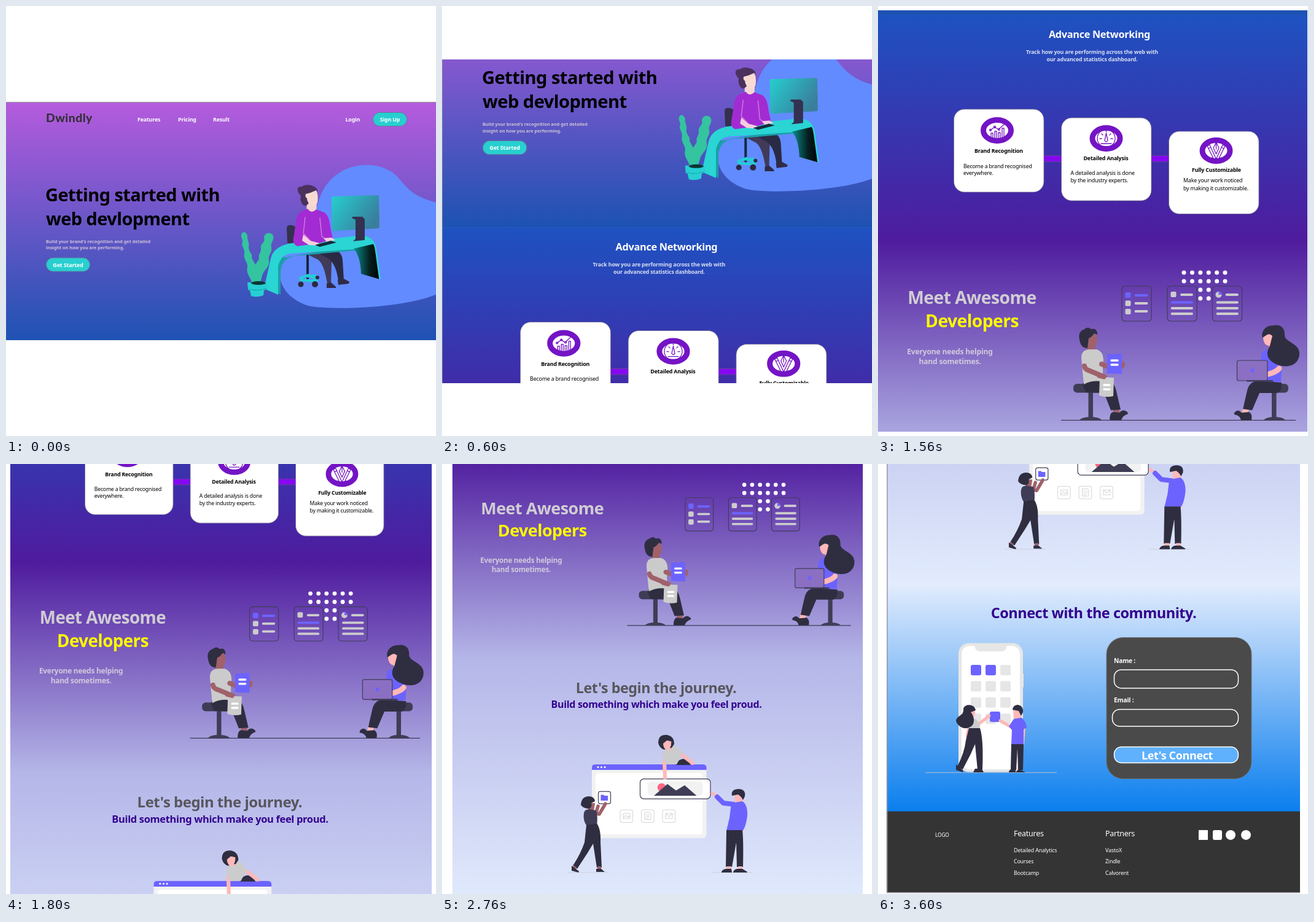
Recreate the animation shown at these times as an HTML page. Size 700 by 700 pixels, loop 4.2 s.

```html
<!DOCTYPE html>
<html lang="en">
<head>
<meta charset="utf-8">
<title>Landing page tour</title>
<style>
html, body { margin: 0; width: 100%; height: 100%; overflow: hidden; background: #fff; }
svg { display: block; width: 100vw; height: 100vh; }
text { font-family: "Noto Sans", sans-serif; letter-spacing: -.02em; fill: #fff; }
.b { font-weight: 700; }
.s { font-size: 8.85px; }
.k { fill: #000; }
.mid { text-anchor: middle; }
.dark { fill: #2f2e41; }
.slate { fill: #3f3d56; }
.vio { fill: #6c63ff; }
.pink { fill: #ffb8b8; }
.tan { fill: #a0616a; }
.grey { fill: #ccc; }
.white { fill: #fff; }
.line { fill: none; stroke-linecap: round; stroke-linejoin: round; }
.edge { stroke: #3f3d56; stroke-width: 1.2; }
</style>
</head>
<body>
<svg viewBox="0 0 700 700">
<defs>
  <clipPath id="clip"><rect id="win"/></clipPath>
  <linearGradient id="g1" x2="0" y2="1"><stop stop-color="#b55bdd"/><stop offset="1" stop-color="#1c52b2"/></linearGradient>
  <linearGradient id="g2" x2="0" y2="1"><stop stop-color="#1e52c1"/><stop offset="1" stop-color="#4f1b9e"/></linearGradient>
  <linearGradient id="g3" x2="0" y2="1"><stop stop-color="#4f1b9e"/><stop offset="1" stop-color="#b4b5e7"/></linearGradient>
  <linearGradient id="g4" x2="0" y2="1"><stop stop-color="#b4b6e8"/><stop offset="1" stop-color="#e2ecfd"/></linearGradient>
  <linearGradient id="g5" x2="0" y2="1"><stop stop-color="#e2ecfd"/><stop offset="1" stop-color="#0a7eee"/></linearGradient>
  <linearGradient id="screen" y2=".5"><stop stop-color="#25d0cf"/><stop offset="1" stop-color="#397f9d"/></linearGradient>
  <linearGradient id="leg"><stop stop-color="#0b8f91"/><stop offset=".6" stop-color="#04201f"/><stop offset="1" stop-color="#000"/></linearGradient>
</defs>
<g clip-path="url(#clip)"><g id="page">

<g id="back">
  <rect x="-6" y="-381" width="720" height="396" fill="url(#g1)"/>
  <rect x="-6" y="14.500" width="720" height="368" fill="url(#g2)"/>
  <rect x="-6" y="382" width="720" height="347" fill="url(#g3)"/>
  <rect x="-6" y="728.500" width="720" height="427" fill="url(#g4)"/>
  <rect x="-6" y="1155" width="720" height="388" fill="url(#g5)"/>
  <rect x="-6" y="1541.500" width="720" height="138" fill="#343434"/>
  <path d="M-6-379.600H714M-3.400-380V1680M-6 1679.500H714" stroke="#98969f" stroke-width="1.400"/>
</g>

<g id="hero" transform="scale(1.0015) translate(-2.9 -535.5)">
  <text x="65" y="189" style="font:800 19.5px Lato,sans-serif;letter-spacing:.02em;fill:#34303a">Dwindly</text>
  <g class="b" font-size="8.9">
    <text x="214" y="188.300">Features</text><text x="280" y="188.300">Pricing</text>
    <text x="337" y="188.300">Result</text><text x="552.500" y="188.300">Login</text>
  </g>
  <g fill="#28cfd0" stroke="#5d7f9c">
    <rect x="597.500" y="173.500" width="55" height="22" rx="11"/>
    <rect x="65.500" y="410" width="71" height="22" rx="11"/>
  </g>
  <text class="b mid" x="625" y="188.300" font-size="8.9">Sign Up</text>
  <text class="b mid" x="101" y="424.800" font-size="9">Get Started</text>
  <g class="b" font-size="29"><text class="k" x="64" y="318">Getting started with</text><text class="k" x="65" y="357">web devlopment</text></g>
  <g class="b" font-size="7.25">
    <text x="65" y="386" style="fill:#cfc3d6;letter-spacing:0">Build your brand's recognition and get detailed</text>
    <text x="65" y="396" style="fill:#cfc3d6;letter-spacing:0">insight on how you are performing.</text>
  </g>

  <path fill="#628bff" d="M710 322C672 314 657 303 640 281C618 254 572 253 545 270C518 286 510 310 503 338C496 366 462 385 449 415C440 440 447 473 492 488C530 496 660 492 710 465Z"/>
  <path fill="#34304f" d="M457 361Q458 355 466 357L478 362V388L458 386Z"/>
  <!-- chair and legs -->
  <path class="line" stroke="#17263f" stroke-width="4" d="M491 405V443"/>
  <path class="line" stroke="#22cfd3" stroke-width="4" d="M479 443L492 438L506 446M491 440L503 439M480 446L505 448"/>
  <g fill="#2d2843"><circle cx="480" cy="453" r="4.500"/><circle cx="503" cy="453" r="5"/><circle cx="507" cy="442" r="3"/></g>
  <path fill="#413a58" d="M490 404L521 402Q530 405 530 416L529 451L523 452Q518 420 508 413Z"/>
  <path fill="#2a2a45" d="M510 403L539 399Q547 402 548 414L550 447L541 448Q538 422 526 412Z"/>
  <path fill="#302a48" d="M522 452L529 450L537 457V459H522ZM540 446L550 444L559 449L558 452L541 454Z"/>
  <!-- desk -->
  <path fill="#1a9fa9" d="M441 412L570 388V398L470 407Q449 411 447 432V470L441 466Z"/>
  <path fill="#2ad5d4" d="M420 460L431 411Q436 390 466 386L572 374Q594 374 601 390L567 396L464 403Q447 405 443 424V470Z"/>
  <path fill="url(#leg)" d="M566 395L600 387L609 445L578 436Q577 407 566 395Z"/>
  <path class="line" stroke="#2ad5d4" stroke-width="2.500" d="M586 376Q600 381 602 397L608.500 444"/>
  <path fill="url(#screen)" d="M533 310L604 308Q607 308 607 311L608 359Q608 362 605 362L534 366Q531 366 531 363L530 313Q530 310 533 310Z"/>
  <path fill="#333052" d="M563 345Q563 343 566 343L580 343L584 347V381L565 383L569 379V348Z"/>
  <!-- worker -->
  <path fill="#f5d6d2" d="M490 318H506L505 339L489 335Z"/>
  <path fill="#a32bd3" d="M482 334L491 330Q497 339 505 331L518 336Q526 341 528 360L532 379L511 386L474 391Q466 388 468 377L473 346Q475 337 482 334Z"/>
  <path class="line" stroke="#d98ae2" stroke-width="1.200" d="M487 344L484 370L496 383M511 345L514 375L520 379"/>
  <path fill="#f4cede" d="M484 372L495 382L510 386L507 390L493 389L482 382ZM517 378L530 377L536 381L523 385Z"/>
  <path fill="#142c3c" d="M503 389L529 382L538 385L511 392Z"/>
  <path fill="#4b315d" d="M480 309C472 301 473 293 482 294C486 289 503 291 507 299L506 306L490 309Q490 316 493 321Q486 329 482 322Q478 316 480 309Z"/>
  <path fill="#f7dbd2" d="M488 306Q497 304 505 300Q509 308 507 320Q503 328 495 324Q490 318 490 313Q486 311 488 306Z"/>
  <!-- plant -->
  <path fill="#34c4a0" d="M383 372C385 366 391 367 393 374C392 382 397 384 395 393C395 401 402 403 400 410L406 421L412 412C410 403 416 402 415 394C414 386 423 385 420 377C421 368 432 367 435 374C437 382 430 385 432 393C434 401 426 405 428 414C430 424 421 429 418 436L413 453H401C400 443 390 437 393 425C394 417 386 413 388 403C389 394 382 391 385 384C386 380 382 377 383 372Z"/>
  <path fill="#26cfd2" d="M393 450L424 449L426 460L420 463L419 471Q408 475 399 472L397 463L394 462Z"/>
  <ellipse cx="411" cy="451" rx="12" ry="3" fill="#0b3534"/>
  <path class="line" stroke="#159ea8" d="M396 461Q409 465 424 460"/>
</g>

<g id="cards">
  <text class="b mid" x="360.500" y="52" font-size="16.300">Advance Networking</text>
  <g class="b mid s" fill-opacity=".82"><text x="348.500" y="78">Track how you are performing across the web with</text><text x="348.500" y="90">our advanced statistics dashboard.</text></g>
  <path d="M265 248.500H305M440 248.500H480" stroke="#6b3f9d" stroke-width="10.500"/>
  <path d="M265 248.500H305M440 248.500H480" stroke="#8606f2" stroke-width="8.500"/>
  <g fill="#fff" stroke="#6f6a8c" stroke-width=".8">
    <rect x="123.500" y="168" width="146.500" height="135" rx="17"/>
    <rect x="298.500" y="182" width="146.500" height="135" rx="17"/>
    <rect x="473.500" y="204" width="146.500" height="134.500" rx="17"/>
  </g>
  <g fill="#fff" stroke="#7414c5" stroke-width="9">
    <ellipse cx="194" cy="202.500" rx="22.500" ry="17"/><ellipse cx="371.500" cy="215.500" rx="22.500" ry="17"/><ellipse cx="550.500" cy="235.500" rx="22.500" ry="17"/>
  </g>
  <g class="line" stroke="#7414c5" stroke-width="1.300">
    <path d="M180 216H209M184 215V207H187V215M190 215V204H193V215M196 215V206H199V215M202 215V199H205V215M183 202L190 197L196 201L206 192"/>
    <circle cx="183" cy="202" r="1.500"/><circle cx="190" cy="197" r="1.500"/><circle cx="197" cy="201" r="1.500"/>
    <circle cx="371.500" cy="215.500" r="14.500"/><path d="M371.500 207L369 219Q371.500 223 374 219ZM361 216H364M379 216H382M364 208L366 210M379 208L377 210M371.500 203V205M363 224H380"/>
    <path d="M536 228L540 226L550 248L547 250ZM565 228L561 226L551 248L554 250ZM550.500 222L546 231L550.500 241L555 231ZM550.500 222V233M538 232L542 230M563 232L559 230M543 247L550 250L558 247"/>
  </g>
  <g class="b s"><text class="k" x="157" y="239">Brand Recognition</text><text class="k" x="334.500" y="251.300">Detailed Analysis</text><text class="k" x="511" y="270">Fully Customizable</text></g>
  <g class="s"><text class="k" x="139" y="263.500">Become a brand recognised</text><text class="k" x="139" y="275">everywhere.</text>
    <text class="k" x="313.500" y="275.300">A detailed analysis is done</text><text class="k" x="313.500" y="287.300">by the industry experts.</text>
    <text class="k" x="497" y="287.300">Make your work noticed</text><text class="k" x="497" y="299.500">by making it customizable.</text></g>
</g>

<g id="meet">
  <g class="b mid" font-size="28.300"><text x="153" y="484.500" style="fill:#d0cdd3">Meet Awesome</text><text x="153" y="522.500" style="fill:#fdf900">Developers</text></g>
  <g class="b mid" font-size="12.200"><text x="117" y="567" style="fill:#d0c8dc">Everyone needs helping</text><text x="117" y="583" style="fill:#d0c8dc">hand sometimes.</text></g>
  <g id="dots" class="white"></g>
  <g class="line edge"><rect x="397" y="456" width="48" height="57" rx="5"/><rect x="471" y="456" width="48" height="57" rx="5"/><rect x="544.500" y="456" width="48" height="57" rx="5"/></g>
  <g class="line" stroke="#ccc" stroke-width="3.800">
    <path d="M419.500 484H437.500M419.500 497H437.500M494 470H511M478.500 492H511M478.500 501H511M567.500 470H585M552.500 482.500H585M552.500 492H585M552.500 501H585"/>
    <path stroke="#6c63ff" d="M419.500 471H437.500M478.500 482.500H511"/>
  </g>
  <rect class="vio" x="402.500" y="466" width="9" height="9" rx="2"/>
  <g class="grey"><rect x="402.500" y="479.500" width="9" height="9" rx="2"/><rect x="402.500" y="493" width="9" height="9" rx="2"/><rect x="476.500" y="465" width="9" height="9" rx="2"/><circle cx="554.500" cy="470" r="5"/></g>
  <path class="vio" d="M554.500 470V465A5 5 0 0 1 559.500 470Z"/>
  <path class="edge" d="M298 674.300H680"/>
  <g class="slate">
    <rect x="318" y="615" width="46" height="14.500" rx="6"/><rect x="342.500" y="628" width="7.500" height="43"/><path d="M328 674Q332 669 346 669Q360 669 364 674Z"/>
    <rect x="621" y="615" width="47" height="14.500" rx="6"/><rect x="641" y="628" width="7.500" height="43"/><path d="M628 674Q632 669 645 669Q659 669 663 674Z"/>
  </g>
  <!-- left sitter -->
  <path class="tan" d="M382 650H393L393 664L383 663ZM339 548L354 547L353 562L340 562ZM395 579Q402 577 402 583Q402 591 395 591Z"/>
  <ellipse class="tan" cx="349" cy="543" rx="8" ry="13"/>
  <path class="dark" d="M341 557Q330 557 328 543Q325 530 336 526Q342 521 347 526Q357 523 357 535L352 533Q348 539 343 541Z"/>
  <path class="dark" d="M333 617Q334 608 348 609L376 610Q385 613 388 627L395 657L379 658L368 630L338 629Z"/>
  <path fill="#cbcbcb" d="M331 573Q331 559 345 559L356 559Q366 562 367 575L366 588L366 603L363 611Q348 609 335 616Z"/>
  <path class="line" stroke="#a0616a" stroke-width="8" d="M336 586Q337 592 345 594L369 604M364 583L382 590"/>
  <path class="dark" d="M377 672Q378 661 383 661L393 662Q399 655 406 661L407 664Q399 666 396 674H378Z"/>
  <path class="vio" d="M373 567L397 566L397 599L373 598Z"/>
  <path fill="#ccc" d="M361 604L384 605L383 635Q372 638 360 634Z"/>
  <path class="line" stroke="#fff" stroke-width="3.400" d="M380 577H390M380 584H390M368 617H377M368 624H377"/>
  <path class="line" stroke="#a0616a" stroke-width="7" d="M360 602L368 604"/>
  <!-- right sitter -->
  <path class="pink" d="M595 650H605L602 664H592ZM637 544H650V562H636Z"/>
  <ellipse class="pink" cx="636" cy="540" rx="9" ry="13"/>
  <path class="vio" d="M624 570Q625 558 637 559L650 557Q658 562 658 578L656 612H625L621 594Z"/>
  <path class="dark" d="M626 540C623 531 630 520 643 520C657 517 663 526 662 537C664 548 687 549 686 567C685 585 665 592 646 582C631 574 632 563 638 553L642 537Q637 532 632 536Z"/>
  <path class="dark" d="M657 613L618 610Q604 612 601 626L594 656L609 658L621 630L650 630Q658 627 657 613Z"/>
  <path class="line" stroke="#ffb8b8" stroke-width="9" d="M653 590Q648 597 628 601"/>
  <path class="dark" d="M580 662Q586 655 592 662L604 661Q610 664 608 674H591Q589 666 580 665Z"/>
  <rect x="584.500" y="577" width="49.500" height="33" rx="3" fill="#8b6fc2" class="edge"/>
  <path class="slate" d="M600 609H643V611.500H600Z"/><circle class="vio" cx="609.500" cy="593.500" r="3.200"/>
</g>

<g id="journey" transform="scale(1.0488) translate(-17.3 380)">
  <text class="b mid" x="348.500" y="373" font-size="23.300" style="fill:#58565c">Let's begin the journey.</text>
  <text class="b mid" x="349" y="397" font-size="16" style="fill:#33018f">Build something which make you feel proud.</text>
  <rect x="244" y="489" width="186.500" height="120" rx="6" fill="#f2f2f2"/>
  <path class="vio" d="M244 498V494Q244 489 250 489H424Q430.500 489 430.500 494V498Z"/>
  <rect class="white" x="250" y="503" width="174" height="100" rx="5"/>
  <g class="white"><circle cx="254" cy="493.500" r="1.500"/><circle cx="259.500" cy="493.500" r="1.500"/><circle cx="265" cy="493.500" r="1.500"/></g>
  <rect class="edge" x="322.500" y="512.500" width="114.500" height="32.500" rx="6" fill="#fff"/>
  <rect x="335" y="517" width="89.500" height="23" rx="5" fill="#f2f2f2"/>
  <circle cx="357.500" cy="526.500" r="6.800" fill="#ff6584"/>
  <path class="slate" d="M345 540L367 521L381 531.500L395 523L414.500 540Z"/>
  <g class="line" stroke="#d6d6d6">
    <rect x="290" y="563" width="20.500" height="20.500" rx="3"/><rect x="324.500" y="563" width="20.500" height="20.500" rx="3"/><rect x="359" y="563" width="20.500" height="20.500" rx="3"/>
    <path d="M295 569H306V577H295ZM295 576L299 572L302 575L304 573L306 575M330 567H338L340 569V579H330ZM332 571H338M332 574H338M332 577H336M364 569H375V577H364ZM364 569L369.500 574L375 569"/>
  </g>
  <!-- top helper -->
  <path class="dark" d="M380 490Q385 480 393 480Q401 481 405 490Z"/>
  <path class="line" stroke="#ffb8b8" stroke-width="6" d="M362 483L363 511M386 470L408 487"/>
  <path class="grey" d="M359 469Q368 460 378 459Q387 461 391 472L382 489H365Q358 479 359 469Z"/>
  <path class="dark" d="M352 454Q352 440 366 441Q378 443 378 456L374 462L362 465Q354 463 352 454Z"/>
  <path class="pink" d="M360 451L373 449Q374 458 371 462L374 466L364 465Q359 460 360 451Z"/>
  <path class="dark" d="M357 453Q360 444 374 446L375 452L366 450L359 456Z"/>
  <!-- left helper -->
  <path d="M204 665H271M438 665H505" stroke="#cfcfdc"/>
  <rect class="edge" x="254.500" y="533" width="20" height="20" rx="3" fill="#fff"/>
  <path class="vio" d="M258.500 538.500H263L264.500 540H270V548H258.500Z"/>
  <path class="line" stroke="#a0616a" stroke-width="5.500" d="M248 568L256 570L266 553M250 571L254 557"/>
  <path class="tan" d="M238 552H249L247 565H238Z"/>
  <path class="slate" d="M231 568Q232 562 240 562L251 564Q254 575 252 588L236 590Q229 580 231 568Z"/>
  <path class="dark" d="M226 555Q227 541 239 541Q248 541 249 549L243 552Q245 558 240 561Q230 561 226 555Z"/>
  <path class="dark" d="M235 588L252 585Q259 595 258 615L260 657H252L246 618L237 633L220 659L213 654Q226 634 232 616Z"/>
  <path class="tan" d="M214 653L219 657L217 661L212 658ZM253 655H259V661H253Z"/>
  <path class="dark" d="M211 654L223 663L222 665L211 662ZM251 659H259L265 664H251Z"/>
  <!-- right helper -->
  <path class="line" stroke="#ffb8b8" stroke-width="5" d="M440 536L446 541M490 590L488 597"/>
  <path class="line" stroke="#6c63ff" stroke-width="8" d="M448 542L458 552L475 554"/>
  <path class="pink" d="M476 537H490L489 553H477Z"/>
  <path class="vio" d="M471 552L489 549Q498 555 497 573Q495 588 491 595L489 597H463L468 576Z"/>
  <path class="dark" d="M472 540Q470 530 482 529Q495 529 493 541L490 547Q487 541 482 538Z"/>
  <path class="dark" d="M463 596H489Q491 613 490 656H480L479 616L472 656H462Z"/>
  <path class="pink" d="M463 655H471V661H463ZM482 655H489V661H482Z"/>
  <path class="dark" d="M455 664Q457 659 464 659H471L472 665H455ZM474 664Q476 659 482 659H489L497 664V665H474Z"/>
</g>

<g id="community" transform="scale(1.0437) translate(-18.4 911.4)">
  <text class="b mid" x="351" y="251.500" font-size="23.500" style="fill:#33018f">Connect with the community.</text>
  <path d="M77 502.300H291" stroke="#b9c4d0"/>
  <rect x="234" y="341" width="3" height="23" rx="1" fill="#e6e6e6"/>
  <rect x="131" y="291.500" width="105" height="210" rx="17" fill="#e6e6e6"/>
  <rect class="white" x="136" y="296" width="95" height="201" rx="13"/>
  <path fill="#e6e6e6" d="M157 295H210Q209 305 201 305H166Q158 305 157 295Z"/>
  <g id="apps"></g>
  <rect class="vio" x="182" y="403" width="17" height="17" rx="3"/>
  <!-- pair at the phone -->
  <path class="line" stroke="#ffb8b8" stroke-width="5" d="M163 424L181 410M149 424L145 443M216 428L199 418"/>
  <path class="pink" d="M147 399L157 400Q160 408 155 413V417H147Z"/>
  <path class="grey" d="M148 418Q157 411 163 419L166 426L165 434H149Z"/>
  <path class="dark" d="M139 398C142 390 157 390 159 401L151 404C158 412 158 425 150 428C141 434 129 427 127 418C129 408 140 411 139 398Z"/>
  <path class="dark" d="M148 430H166Q172 448 170 497H162L158 456L151 472L138 497L129 493Q141 469 143 450Z"/>
  <path class="dark" d="M127 489L138 498V502L127 498ZM158 496H169L172 502H155Z"/>
  <path class="line" stroke="#ffb8b8" stroke-width="4" d="M238 430L236 456"/>
  <path class="pink" d="M220 400H233V416H221Z"/>
  <path class="dark" d="M219 400Q220 392 228 392Q237 394 236 404L233 410L229 402Z"/>
  <path class="vio" d="M221 415L234 413Q241 419 242 429L237 432V457H217L218 433L213 427Z"/>
  <path class="dark" d="M217 456H237L236 498H228L227 463L225 498H216ZM213 501Q214 497 218 497H224V502H213ZM225 501Q227 497 231 497L240 502H225Z"/>
  <!-- form -->
  <rect x="372" y="282.500" width="236" height="230" rx="27" fill="#4a4a4a" stroke="#6b747a"/>
  <g fill="none" stroke="#fff" stroke-width="1.500">
    <rect x="384.500" y="335" width="202" height="30" rx="11.500"/><rect x="381.500" y="399.500" width="205" height="27.500" rx="12"/>
    <rect x="384.500" y="460.500" width="202" height="26" rx="12" fill="#5fb0fd"/>
  </g>
  <g class="b" font-size="10.300"><text x="384" y="324.500">Name :</text><text x="384" y="388.500">Email :</text></g>
  <text class="b mid" x="487" y="481" font-size="18">Let's Connect</text>
  <!-- footer -->
  <text x="93" y="607" font-size="8.400">LOGO</text>
  <g font-size="12.500"><text x="221" y="606">Features</text><text x="370" y="606">Partners</text></g>
  <g class="s">
    <text x="221" y="632">Detailed Analytics</text><text x="221" y="650.300">Courses</text><text x="221" y="668.800">Bootcamp</text>
    <text x="370" y="632">VastoX</text><text x="370" y="650.300">Zindle</text><text x="370" y="668.800">Calvorent</text>
  </g>
  <g class="white"><rect x="522" y="596" width="15" height="16"/><rect x="545" y="596" width="15" height="16" rx="3"/><circle cx="574" cy="604" r="8"/><circle cx="599" cy="604" r="8"/></g>
</g>

</g></g>
</svg>
<script>
const $ = id => document.getElementById(id);
const HOLD = 600;

// Scroll stops: zoom, shift x, shift y, then the visible window x, y, w, h
const stops = [
  [.9985, 2.9, 535.5, 0, 156, 700, 388],
  [1.004, 3.5, 345.8, 0, 87, 700, 527],
  [1, 0, 0, 0, 7, 699, 686],
  [.98, 7.5, -214.5, 7, 0, 686, 700],
  [.9535, 17.3, -380, 17, 0, 668, 700],
  [.9688, 14.6, -714.9, 10, 0, 681, 700],
  [.9581, 18.4, -911.4, 14, 0, 673, 699]
];

let dots = '';
for (let r = 0; r < 4; r++)
  for (let c = 0; c < 6; c++)
    if (r < 2 || c === 2 || c === 3)
      dots += `<circle cx="${498 + c * 13.4}" cy="${434 + r * 14}" r="3.5"/>`;
$('dots').innerHTML = dots;

let apps = '';
for (let i = 0; i < 12; i++)
  apps += `<rect x="${151 + i % 3 * 24}" y="${327 + Math.floor(i / 3) * 26.4}" width="17" height="17" rx="3" fill="${i < 2 ? '#6c63ff' : '#e6e6e6'}"/>`;
$('apps').innerHTML = apps;

let shown = -1;
function show(i) {
  if (i === shown) return;
  shown = i;
  const [zoom, dx, dy, ...box] = stops[i];
  $('page').setAttribute('transform', `translate(${dx} ${dy}) scale(${zoom})`);
  ['x', 'y', 'width', 'height'].forEach((k, n) => $('win').setAttribute(k, box[n]));
}

const start = performance.now();
function tick() {
  show(Math.floor((performance.now() - start) / HOLD) % stops.length);
  requestAnimationFrame(tick);
}
show(0);
requestAnimationFrame(tick);
</script>
</body>
</html>
```
